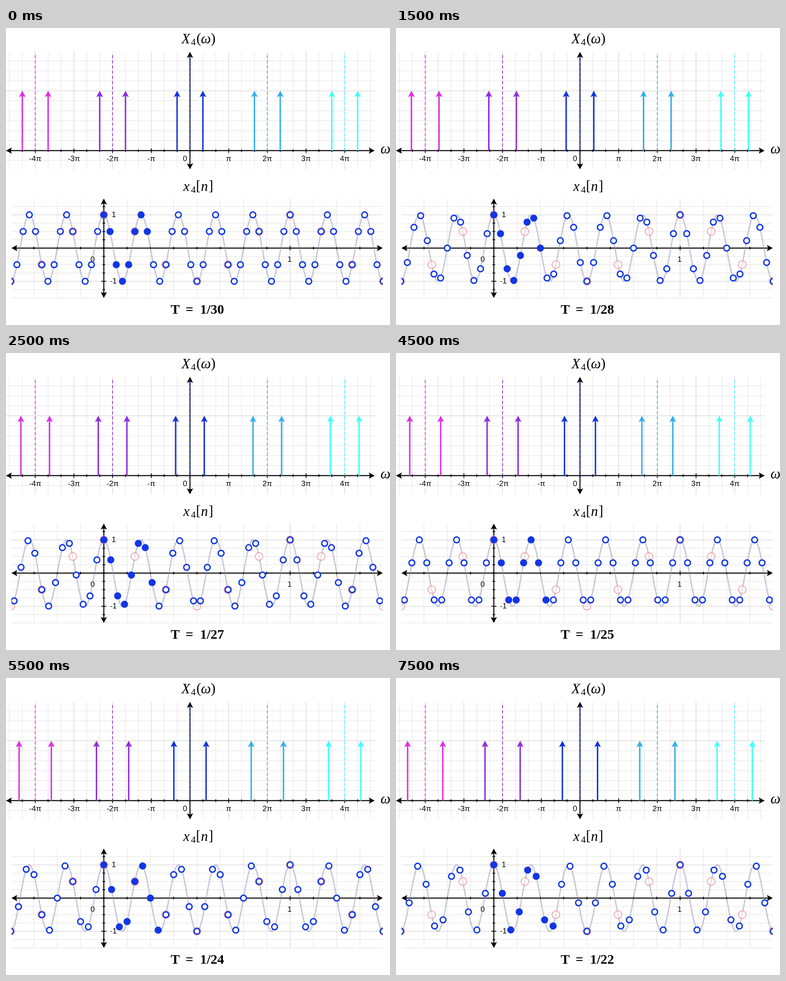
Recreate the animation shown at these times as an HTML page with a canvas. Size 851 px wide and 658 px high, loop 8 s.

```html
<!DOCTYPE html>
<html lang="en">
<head>
<meta charset="utf-8">
<title>Sampling a cosine</title>
<style>
  html, body { margin: 0; width: 100%; height: 100%; overflow: hidden; background: #fff; }
  canvas { display: block; }
</style>
</head>
<body>
<canvas id="stage" width="851" height="658"></canvas>
<script>
const ctx = document.getElementById('stage').getContext('2d');
const TAU = 2 * Math.PI, FREQ = 5;
const BLUE = '#1236e6';
const SANS = '17px "Liberation Sans", Arial, sans-serif';
const MATH = 'italic 31px "Liberation Serif", serif';
const ROMAN = '31px "Liberation Serif", serif';
const SMALL = '21px "Liberation Serif", serif';
const BOLD = 'bold 30px "Liberation Serif", serif';

const spectrum = { left: 0, right: 817, top: 53, bottom: 313, x0: 407.7, y0: 271.7, dx: 28.58, dy: 22.1, majorX: 3, majorY: 6 };
const signal = { left: 12, right: 835, top: 378, bottom: 598, x0: 216.8, y0: 487.6, dx: 51.6, dy: 18.4, majorX: 8, majorY: 4 };
const copies = ['#dc30e6', '#8f2de0', '#1434dc', '#34b0ee', '#42fff8'];

function line(x1, y1, x2, y2, color, width, dash = []) {
  ctx.strokeStyle = color;
  ctx.lineWidth = width;
  ctx.setLineDash(dash);
  ctx.beginPath();
  ctx.moveTo(x1, y1);
  ctx.lineTo(x2, y2);
  ctx.stroke();
  ctx.setLineDash([]);
}

function arrowHead(x, y, angle, color, size = 13) {
  ctx.save();
  ctx.translate(x, y);
  ctx.rotate(angle);
  ctx.fillStyle = color;
  ctx.beginPath();
  ctx.moveTo(0, 0);
  ctx.lineTo(-size, -size * 0.53);
  ctx.lineTo(-size * 0.8, 0);
  ctx.lineTo(-size, size * 0.53);
  ctx.fill();
  ctx.restore();
}

function text(str, x, y, font, align = 'left', halo = false) {
  ctx.font = font;
  ctx.textAlign = align;
  if (halo) {
    ctx.strokeStyle = '#fff';
    ctx.lineWidth = 4;
    ctx.lineJoin = 'round';
    ctx.strokeText(str, x, y);
  }
  ctx.fillStyle = '#000';
  ctx.fillText(str, x, y);
}

const label = (str, x, y) => text(str, x, y, SANS, 'center', true);

// Calls draw(position, index) for each grid step inside [from, to].
function steps(origin, step, from, to, draw) {
  for (let i = Math.ceil((from - origin) / step); origin + i * step <= to; i++) draw(origin + i * step, i);
}

function grid(p) {
  const shade = (i, major) => i % major ? '#e2e2e2' : '#cacaca';
  steps(p.x0, p.dx, p.left, p.right, (x, i) => line(x, p.top, x, p.bottom, shade(i, p.majorX), 1));
  steps(p.y0, p.dy, p.top, p.bottom + 1, (y, i) => line(p.left, y, p.right, y, shade(i, p.majorY), 1));
}

function axes(p, yTicks) {
  line(p.left + 9, p.y0, p.right - 9, p.y0, '#000', 2.2);
  line(p.x0, p.top + 9, p.x0, p.bottom - 9, '#000', 2.2);
  arrowHead(p.left, p.y0, Math.PI, '#000');
  arrowHead(p.right, p.y0, 0, '#000');
  arrowHead(p.x0, p.top, -Math.PI / 2, '#000');
  arrowHead(p.x0, p.bottom, Math.PI / 2, '#000');
  steps(p.x0, p.dx, p.left + 14, p.right - 14, (x, i) => {
    const h = i % p.majorX ? 3 : 5;
    line(x, p.y0 - h, x, p.y0 + h, '#000', 1.8);
  });
  if (yTicks) steps(p.y0, p.dy, p.top + 14, p.bottom - 14, (y, i) => {
    const w = i % p.majorY ? 3 : 5.5;
    line(p.x0 - w, y, p.x0 + w, y, '#000', 1.8);
  });
}

function circle(x, y, r, color, width, fill) {
  ctx.beginPath();
  ctx.arc(x, y, r, 0, TAU);
  ctx.fillStyle = fill;
  ctx.fill();
  ctx.strokeStyle = color;
  ctx.lineWidth = width;
  ctx.stroke();
}

const wave = s => Math.cos(TAU * FREQ * s);
const toX = s => signal.x0 + s * signal.dx * 8;
const toY = v => signal.y0 - v * signal.dy * 4;

function samples(rate, draw) {
  for (let n = -Math.ceil(rate * 0.52); n <= rate * 1.53; n++) draw(toX(n / rate), toY(wave(n / rate)), n);
}

function drawSpectrum(rate) {
  const p = spectrum, pi = p.dx * 3;
  grid(p);
  for (let k = -4; k <= 4; k++) {
    if (!k || k === 3 || k === -3 || Math.abs(k) < 5) {
      const name = k === 0 ? '0' : (k < 0 ? '-' : '') + (Math.abs(k) > 1 ? Math.abs(k) : '') + 'π';
      label(name, p.x0 + k * pi - (k ? 0 : 11), 295);
    }
  }
  axes(p, false);
  copies.forEach((color, i) => {
    const center = p.x0 + (i - 2) * 2 * pi;
    line(center, 60, center, p.y0, color, 1.7, [7, 4.5]);
    for (const side of [-1, 1]) {
      const x = center + side * pi * 2 * FREQ / rate;
      line(x, p.y0, x, 148, color, 3.2);
      arrowHead(x, 139, -Math.PI / 2, color, 14);
    }
  });
}

function drawSignal(rate) {
  const p = signal;
  grid(p);
  label('1', 239, 419);
  label('-1', 238, 566);
  label('0', 192, 518);
  label('1', 628.5, 518);
  axes(p, true);
  ctx.save();
  ctx.beginPath();
  ctx.rect(p.left, p.top, p.right - p.left, p.bottom - p.top);
  ctx.clip();
  ctx.beginPath();
  for (let x = p.left; x <= p.right; x++) ctx.lineTo(x, toY(wave((x - p.x0) / (p.dx * 8))));
  ctx.strokeStyle = 'rgba(120, 120, 165, 0.4)';
  ctx.lineWidth = 3;
  ctx.stroke();
  samples(6, (x, y) => circle(x, y, 8.5, 'rgba(235, 110, 120, 0.5)', 2.4, 'rgba(255, 255, 255, 0.5)'));
  samples(rate, (x, y, n) => circle(x, y, 6.4, BLUE, 3, n >= 0 && n < 8 ? BLUE : '#fff'));
  ctx.restore();
}

function drawTitles(rate) {
  text('X', 389, 34, MATH);
  text('4', 410, 38, SMALL);
  text('(', 422, 33, ROMAN);
  text('ω', 432, 34, MATH);
  text(')', 454, 33, ROMAN);
  text('x', 393, 361, MATH);
  text('4', 410, 365, SMALL);
  text('[', 421, 360, ROMAN);
  text('n', 432, 361, MATH);
  text(']', 449, 360, ROMAN);
  text('ω', 830, 278, MATH);
  text('T', 365, 633, BOLD);
  text('=', 398, 633, BOLD);
  text('1/' + rate, 430, 633, BOLD);
}

function render(now) {
  const rate = 30 - Math.floor((now % 8000 + 500) / 1000);
  ctx.fillStyle = '#fff';
  ctx.fillRect(0, 0, 851, 658);
  drawSpectrum(rate);
  drawSignal(rate);
  drawTitles(rate);
}

const start = performance.now();
function tick() {
  render(performance.now() - start);
  requestAnimationFrame(tick);
}
tick();
</script>
</body>
</html>
```
